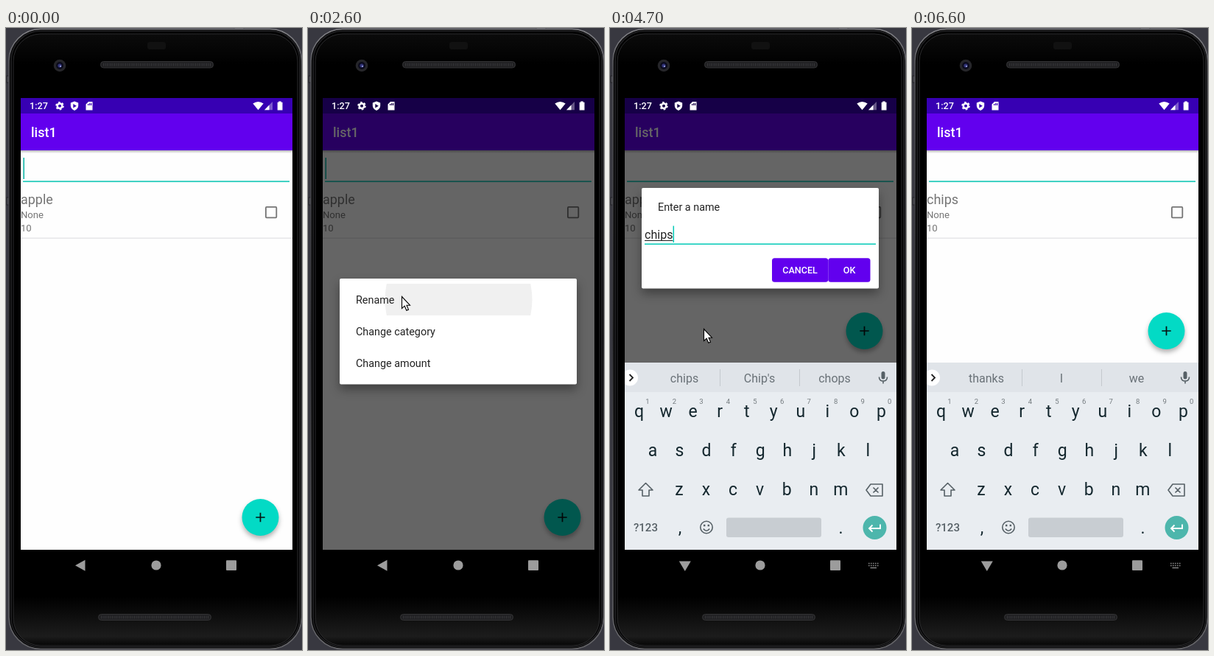
These frames come from a looping animation (402 by 844 pixels, 6700 ms). An HTML page:

```html
<!DOCTYPE html>
<html lang="en">
<head>
<meta charset="utf-8">
<title>Rename a list item</title>
<style>
html, body { margin: 0; width: 100%; height: 100%; overflow: hidden; background: #383840; }
svg { display: block; width: 402px; height: 844px; font-family: Roboto, "Open Sans", sans-serif; }
text { white-space: pre; }
.med { font-weight: 500; }
.mid { text-anchor: middle; }
.item { font-size: 14.37px; fill: #222; }
.sub { font-size: 13.1px; fill: #757575; }
.btn { font-size: 12.57px; font-weight: 500; fill: #fff; text-anchor: middle; }
.key { font-size: 23px; fill: #14272e; text-anchor: middle; }
.num { font-size: 9.5px; fill: #737a7e; text-anchor: middle; }
.tip { font-size: 16px; fill: #697177; text-anchor: middle; }
.line { fill: none; stroke: #566066; stroke-width: 1.6; }
.card { filter: drop-shadow(0 7px 7px rgba(0,0,0,.36)); }
</style>
</head>
<body>
<svg viewBox="0 0 402 844">
  <defs>
    <clipPath id="screen"><rect x="20" y="95" width="369" height="613"/></clipPath>
    <clipPath id="rowClip"><rect x="20" y="214" width="369" height="71"/></clipPath>
    <clipPath id="editClip"><rect x="43" y="369" width="322" height="43"/></clipPath>
    <clipPath id="renameClip"><rect x="43" y="347" width="322" height="43"/></clipPath>
    <linearGradient id="body" x2="0" y2="1">
      <stop offset="0" stop-color="#0b0b0b"/><stop offset=".05" stop-color="#000"/>
      <stop offset=".92" stop-color="#000"/><stop offset=".985" stop-color="#1c1c1c"/>
      <stop offset="1" stop-color="#060606"/>
    </linearGradient>
    <linearGradient id="rim" x2="0" y2="1">
      <stop offset="0" stop-color="#85858a"/><stop offset=".06" stop-color="#55555a"/>
      <stop offset=".5" stop-color="#2c2c2f"/><stop offset="1" stop-color="#66666a"/>
    </linearGradient>
    <linearGradient id="barShade" x2="0" y2="1">
      <stop offset="0" stop-opacity=".28"/><stop offset="1" stop-opacity="0"/>
    </linearGradient>
  </defs>

  <!-- phone -->
  <rect width="402" height="844" fill="#383840"/>
  <g fill="#4b4b52" stroke="#1d1d20" stroke-width=".8">
    <rect x="1" y="65" width="8" height="9"/><rect x="1" y="230" width="8" height="10"/>
    <rect x="310" y="-1" width="13" height="5"/>
  </g>
  <rect x="4" y="1.5" width="397.5" height="841" rx="43" fill="#000" stroke="url(#rim)" stroke-width="1.6"/>
  <rect x="7" y="4" width="392" height="836" rx="40" fill="none" stroke="#1d1d1f" stroke-width="2"/>
  <rect x="10" y="8" width="386" height="830" rx="37" fill="url(#body)" stroke="#353538" stroke-width=".8"/>
  <rect x="192" y="19" width="25" height="10" rx="3" fill="#111"/>
  <g fill="#202022" stroke="#343436">
    <rect x="128.5" y="45.5" width="153" height="8.5" rx="4"/>
    <rect x="125.5" y="795.5" width="153" height="8" rx="4"/>
  </g>
  <g fill="none" stroke="#37373a" stroke-width="4" stroke-dasharray="1 1.5">
    <path d="M132 49.7H278M129 799.5H275"/>
  </g>
  <circle cx="73" cy="51" r="8.3" fill="#26262a"/>
  <circle cx="73" cy="51" r="5" fill="#0b0b1c"/>
  <circle cx="73" cy="51" r="2.6" fill="#33357a"/>
  <circle cx="74" cy="52" r="1" fill="#a9b0e8"/>

  <g clip-path="url(#screen)">
    <!-- app -->
    <rect x="20" y="95" width="369" height="613" fill="#fefefe"/>
    <rect x="20" y="166" width="369" height="4" fill="url(#barShade)"/>
    <rect x="20" y="95" width="369" height="21" fill="#3700b3"/>
    <rect x="20" y="116" width="369" height="50" fill="#6200ee"/>
    <text class="med" x="34" y="148.3" font-size="17.96" fill="#fff">list1</text>
    <rect x="23" y="207.4" width="362" height="1.7" fill="#1cc9b8"/>
    <rect id="searchCaret" x="23.4" y="176" width="1.6" height="29" fill="#12b5a6"/>
    <text id="name" x="20" y="239" font-size="17.96" fill="#757575">apple</text>
    <text class="sub" x="20" y="258.4">None</text>
    <text class="sub" x="20" y="276.3">10</text>
    <rect x="352.9" y="242.9" width="14.4" height="14.4" rx="1" fill="none" stroke="#757575" stroke-width="1.8"/>
    <rect x="20" y="284.6" width="369" height="1" fill="#d9d9de"/>
    <g clip-path="url(#rowClip)"><circle id="rowRipple" cx="204" cy="250"/></g>
    <g id="fab">
      <circle cx="345.5" cy="664" r="25" fill="#03dac5" style="filter:drop-shadow(0 4px 3px rgba(0,0,0,.3))"/>
      <path d="M339.3 664H351.7M345.5 657.8V670.2" stroke="#08100f" stroke-width="1.7"/>
    </g>
    <rect id="dim" x="20" y="95" width="369" height="613"/>

    <!-- status icons -->
    <g fill="#fff">
      <text class="med" x="32" y="110.3" font-size="12.7">1:27</text>
      <circle cx="73" cy="105.7" r="3.3" fill="none" stroke="#fff" stroke-width="2.5"/>
      <circle cx="73" cy="105.7" r="5" fill="none" stroke="#fff" stroke-width="1.6" stroke-dasharray="2.6 2.636"/>
      <path fill-rule="evenodd" d="M93 99.5L98.2 101.5V105.5Q98 109.7 93 112Q88 109.7 87.800 105.500V101.5ZM91.300 103V108.500L95.800 105.700Z"/>
      <path fill-rule="evenodd" d="M112 100H117.500V111.500H108.500V103.500ZM111 103V105H112.200V103ZM113 102V105H114.200V102ZM115 102V105H116.200V102Z"/>
      <path d="M335.300 102.500Q342.500 97.500 349.700 102.500L342.500 111.300Z"/>
      <path d="M362 100V111.300H351Z" opacity=".35"/><path d="M357.500 104.600V111.300H351Z"/>
      <path d="M370.300 99.500H373.700V100.700H375.500V111.500H368.700V100.700H370.300Z"/>
    </g>

    <!-- menus -->
    <g id="menu1">
      <rect class="card" x="43" y="361.500" width="322" height="100.500" rx="2" fill="#fff"/>
      <g clip-path="url(#editClip)"><circle id="editRipple" cx="204" cy="390.500" opacity=".06"/></g>
      <text class="item" x="65" y="395.900">Edit</text>
      <text class="item" x="65" y="438.900">Delete</text>
    </g>
    <g id="menu2">
      <rect class="card" x="43" y="340" width="322" height="143.500" rx="2" fill="#fff"/>
      <g clip-path="url(#renameClip)"><circle id="renameRipple" cx="204.500" cy="368.500" opacity=".06"/></g>
      <text class="item" x="65" y="374.300">Rename</text>
      <text class="item" x="65" y="417.300">Change category</text>
      <text class="item" x="65" y="460.300">Change amount</text>
    </g>

    <!-- name dialog -->
    <g id="dialog">
      <rect class="card" x="43" y="343.500" width="322" height="136.500" rx="2" fill="#fff"/>
      <text class="item" x="65" y="374.700">Enter a name</text>
      <rect id="selection" x="47" y="395" width="39" height="22.500" fill="#91ebe2"/>
      <text id="field" x="47" y="412.600" font-size="16.1" fill="#222">apple</text>
      <rect id="composing" x="47" y="414.500" height="1" fill="#222"/>
      <rect id="fieldCaret" y="395" width="1.500" height="22.500" fill="#03c9b6"/>
      <rect x="47" y="418.900" width="314" height="1.600" fill="#12cdbb"/>
      <rect x="220" y="438.700" width="76.300" height="32.500" rx="3.500" fill="#6200ee"/>
      <rect x="296.300" y="438.700" width="57.200" height="32.500" rx="3.500" fill="#6200ee"/>
      <rect id="okPress" x="296.300" y="438.700" width="57.200" height="32.500" rx="3.500" fill="#fff"/>
      <text class="btn" x="258" y="459.600">CANCEL</text>
      <text class="btn" x="325" y="459.600">OK</text>
    </g>

    <!-- keyboard -->
    <g id="keyboard">
      <rect x="20" y="454" width="369" height="254" fill="#e9edf1"/>
      <rect x="20" y="454" width="369" height="40" fill="#e0e4e9"/>
      <circle cx="27" cy="474.500" r="11" fill="#fff"/>
      <path class="line" d="M26.500 470L31 474.500L26.500 479" style="stroke:#222;stroke-width:1.800"/>
      <g id="tips">
        <path d="M149.500 463V486M257.500 463V486" stroke="#c4c9ce"/>
        <text class="tip" x="101" y="480.700"></text>
        <text class="tip" x="203" y="480.700"></text>
        <text class="tip" x="305" y="480.700"></text>
      </g>
      <rect x="368.500" y="466" width="5" height="10.500" rx="2.500" fill="#566066"/>
      <path class="line" d="M365.500 473.500Q365.500 479 371 479T376.500 473.500M371 479V482.500"/>
      <g id="keys"></g>
      <path class="line" d="M48.500 617.500L58 627H53V635H44V627H39Z" stroke-linejoin="round"/>
      <path class="line" d="M354 619H370V635H354L348 627ZM357.500 623.500L364.500 630.500M364.500 623.500L357.500 630.500" stroke-linejoin="round"/>
      <text class="med mid" x="48.500" y="683" font-size="15" fill="#566066">?123</text>
      <text class="key" x="95" y="686">,</text>
      <text class="key" x="313.500" y="686">.</text>
      <circle class="line" cx="131" cy="677.500" r="8.200"/>
      <path class="line" d="M126.800 679.500Q131 685 135.200 679.500"/>
      <path d="M127 675h2.400M132.600 675h2.400" stroke="#566066" stroke-width="2.400"/>
      <rect x="158" y="664.500" width="129" height="26.500" rx="3" fill="#c8cdd2"/>
      <circle cx="359.500" cy="678" r="16" fill="#4db6ac"/>
      <path d="M367 673.500V679H352.500M356.500 674.500L352 679L356.500 683.500" fill="none" stroke="#fff" stroke-width="1.900"/>
    </g>
  </g>

  <!-- navigation -->
  <g fill="#9c9c9c">
    <path id="back" d="M94 729.300L107.500 721.800V736.800Z"/>
    <g id="hide">
      <path d="M93.800 723.500H109.800L101.800 737Z"/>
      <path d="M351 726.500H364.500M351 729.500H364.500" stroke="#8a8a8a" stroke-width="1.600" stroke-dasharray="1.600 1.370"/>
      <path d="M353.500 732.500H362" stroke="#8a8a8a" stroke-width="1.400"/>
    </g>
    <circle cx="204" cy="729" r="6.600"/>
    <rect x="299" y="722.300" width="14" height="13.700" rx="1"/>
  </g>

  <path id="pointer" d="M.5 .5V16.500L4.200 13.200L6.800 19.300L9.500 18.100L7 12.200H11.500Z" fill="#fff" stroke="#000" stroke-width="1.100"/>
</svg>

<script>
const LOOP = 6700, STEP = 100;
const $ = id => document.getElementById(id);
const set = (id, name, value) => $(id).setAttribute(name, value);
const fade = (id, value) => set(id, "opacity", value);
const slide = (id, x, y) => set(id, "transform", `translate(${x} ${y})`);
const show = (id, on) => set(id, "visibility", on ? "inherit" : "hidden");

// Each track lists [time, value, ...]; values are blended in between.
const tracks = {
  dim: [[900, 0], [1000, .1], [1100, .27], [1200, .5], [1300, .6], [2000, .6], [2100, .38], [2200, .42],
        [2400, .6], [2800, .6], [2900, .4], [3000, .42], [3200, .6], [5700, .6], [6100, 0]],
  menu1: [[900, 0], [1000, .4], [1100, .95], [1200, 1], [2000, 1], [2200, 0]],
  menu2: [[2100, 0], [2300, .95], [2400, 1], [2700, 1], [2900, 0]],
  dialog: [[2900, 0], [3100, .95], [3200, 1], [5700, 1], [5900, 0]],
  rowRadius: [[600, 0], [700, 40], [1000, 200]],
  rowAlpha: [[1100, .06], [1300, 0]],
  editRadius: [[1800, 0], [1900, 100], [2000, 175]],
  renameRadius: [[2500, 0], [2600, 100], [2700, 175]],
  okPress: [[5600, 0], [5700, .22], [5900, 0]],
  keyboard: [[3400, 254], [3500, 200], [3600, 90], [3700, 20], [3800, 0]],
  lift: [[3500, 0], [3700, 1]],
  pointer: [[100, 250, 330], [500, 106, 249], [1300, 106, 249], [1600, 127, 384], [2300, 127, 384],
            [2400, 127, 364], [2700, 127, 364], [3300, 127, 408], [4900, 127, 408],
            [5500, 326.5, 336.5], [5700, 326.5, 336.5], [6200, 402, 470]]
};

const typing = [
  [4000, "c", ["c", "can", "call"]],
  [4200, "ch", ["ch", "check", "change"]],
  [4300, "chi", ["chi", "child", "chicken"]],
  [4500, "chip", ["chip", "chips", "chop"]],
  [4600, "chips", ["chip", "chips", "chop"]],
  [4700, "chips", ["chips", "Chip's", "chops"]],
  [5900, "chips", ["thanks", "I", "we"]]
];

function at(track, t) {
  const rows = tracks[track];
  const i = rows.findIndex(row => row[0] > t);
  if (i === 0) return rows[0].slice(1);
  if (i < 0) return rows[rows.length - 1].slice(1);
  const a = rows[i - 1], b = rows[i], k = (t - a[0]) / (b[0] - a[0]);
  return a.slice(1).map((v, n) => v + (b[n + 1] - v) * k);
}

function buildKeys() {
  const rows = [["qwertyuiop", 39.5, 528], ["asdfghjkl", 58, 580.5], ["zxcvbnm", 94, 633.5]];
  $("keys").innerHTML = rows.map(([letters, x0, y], r) =>
    [...letters].map((c, i) => {
      const x = x0 + i * 36.55;
      const digit = r ? "" : `<text class="num" x="${x + 11.3}" y="510">${(i + 1) % 10}</text>`;
      return `<text class="key" x="${x}" y="${y}">${c}</text>${digit}`;
    }).join("")).join("");
}

function drawField(t) {
  const typed = typing.filter(row => row[0] <= t).pop();
  const field = $("field"), tips = $("tips").querySelectorAll("text");
  field.textContent = typed ? typed[1] : "apple";
  show("selection", !typed);
  show("composing", typed);
  show("fieldCaret", typed);
  show("tips", typed);
  if (!typed) return;
  const width = field.getComputedTextLength();
  set("composing", "width", width);
  set("fieldCaret", "x", 47 + width);
  typed[2].forEach((word, i) => tips[i].textContent = word);
}

function draw(t) {
  for (const id of ["dim", "menu1", "menu2", "dialog", "okPress"]) fade(id, at(id, t)[0]);
  set("rowRipple", "r", at("rowRadius", t)[0]);
  fade("rowRipple", at("rowAlpha", t)[0]);
  set("editRipple", "r", at("editRadius", t)[0]);
  set("renameRipple", "r", at("renameRadius", t)[0]);

  const [lift] = at("lift", t);
  slide("fab", 0, -253 * lift);
  slide("dialog", 0, -126.5 * lift);
  slide("keyboard", 0, at("keyboard", t)[0]);
  show("back", t < 3500);
  show("hide", t >= 3500);

  slide("pointer", ...at("pointer", t));
  show("pointer", t >= 100 && t < 6200);
  show("searchCaret", t < 500 || (t >= 1000 && t < 3500) || (t >= 6100 && t < 6600));
  $("name").textContent = t < 5900 ? "apple" : "chips";
  drawField(t);
}

function tick() {
  const t = performance.now() % LOOP;
  draw(Math.floor(t / STEP) * STEP);
  requestAnimationFrame(tick);
}

buildKeys();
tick();
</script>
</body>
</html>
```
